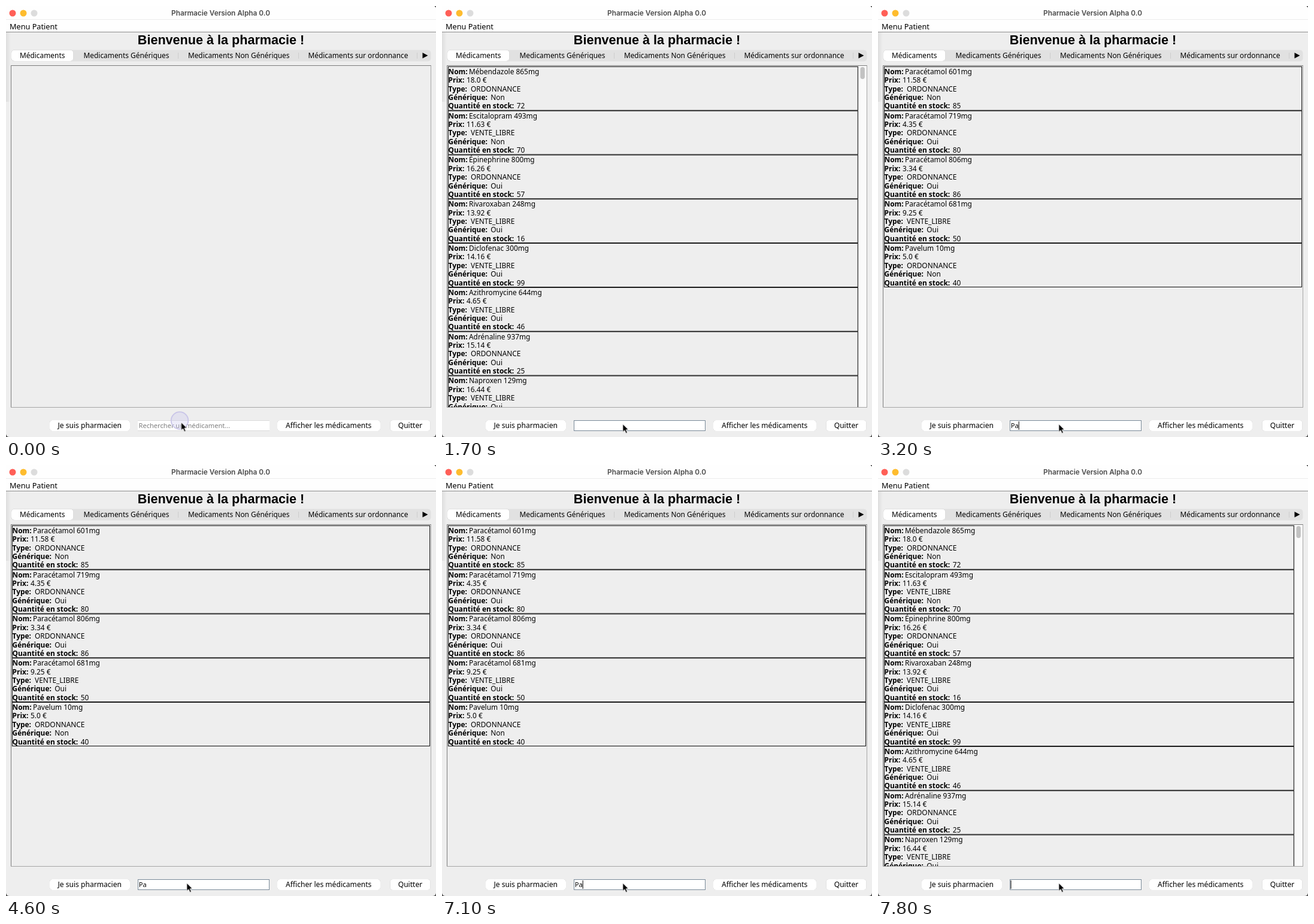
Animation of 718 by 720 pixels, one loop 8000 ms. Source, as an HTML page:

```html
<!DOCTYPE html>
<html lang="fr">
<head>
<meta charset="utf-8">
<title>Pharmacie</title>
<style>
  html, body { margin: 0; width: 100%; height: 100%; overflow: hidden; background: #555; }
  svg { display: block; width: 718px; height: 720px; }
  text { font: 11.9px "Noto Sans", sans-serif; fill: #000; white-space: pre; }
  .label { font-weight: 700; }
  .title { font: 600 11.8px Inter, sans-serif; fill: #4a4a4a; }
  .heading { font: 700 21.6px "Liberation Sans", Arial, sans-serif; }
  .menu { font-size: 12.7px; }
  .button { font-size: 12.1px; }
  .field { font-size: 11.1px; }
  .mid { text-anchor: middle; }
  .raised { fill: #fff; filter: drop-shadow(0 .6px .7px #0005); }

  .idle, .ring, .active, .all, .p, .pa, .par, .caret { animation: 8s step-end infinite; }
  .idle { animation-name: idle; }
  .ring { animation-name: ring; }
  .active { animation-name: active; }
  .all { animation-name: all; }
  .p { animation-name: p; }
  .pa { animation-name: pa; }
  .par { animation-name: par; }
  .caret { animation-name: blink; }
  .cursor { animation: move 8s linear infinite; }

  @keyframes idle { 0% { visibility: visible } 2.5%, 100% { visibility: hidden } }
  @keyframes ring { 0% { visibility: visible } 1.25%, 100% { visibility: hidden } }
  @keyframes active { 0% { visibility: hidden } 2.5%, 100% { visibility: visible } }
  @keyframes all {
    0%, 36.25% { visibility: hidden }
    2.5%, 97.5%, 100% { visibility: visible }
  }
  @keyframes p {
    0%, 38.75%, 97.5%, 100% { visibility: hidden }
    36.25%, 90% { visibility: visible }
  }
  @keyframes pa {
    0%, 58.75%, 90%, 100% { visibility: hidden }
    38.75%, 86.25% { visibility: visible }
  }
  @keyframes par {
    0%, 86.25%, 100% { visibility: hidden }
    58.75% { visibility: visible }
  }
  @keyframes blink {
    0%, 15%, 27.5%, 36.25%, 51.25%, 58.75%, 71.25%, 83.75%, 100% { opacity: 1 }
    8.75%, 21.25%, 33.75%, 45%, 57.5%, 65%, 77.5% { opacity: 0 }
  }
  @keyframes move {
    0%, 5.6% { transform: translate(292.5px, 695.5px); animation-timing-function: ease-in-out }
    14.5%, 100% { transform: translate(301.8px, 698.3px) }
  }
</style>
</head>
<body>
<svg viewBox="0 0 718 720">
  <defs>
    <clipPath id="view"><rect x="9" y="100" width="700" height="570"/></clipPath>
    <linearGradient id="shade"><stop stop-color="#dedede"/><stop offset="1" stop-color="#eee"/></linearGradient>
  </defs>

  <path d="M0 0H715L718 3V715Q717 720 712 720H6Q1 720 0 715Z" fill="#eee"/>
  <path d="M0 0H715L718 3V43H0Z" fill="#fefefe"/>
  <path d="M0 22.5H718" stroke="#ececec"/>
  <path d="M0 43.5H718" stroke="#8c8c8c"/>
  <rect y="44" width="8" height="116" fill="url(#shade)"/>
  <circle cx="11" cy="12" r="5.5" fill="#ff5f57"/>
  <circle cx="29" cy="12" r="5.5" fill="#febc2e"/>
  <circle cx="47" cy="12" r="5.5" fill="#dcdcdc"/>
  <text class="title mid" x="358.5" y="16">Pharmacie Version Alpha 0.0</text>
  <text class="menu" x="6" y="39">Menu Patient</text>
  <text class="heading mid" x="359" y="64">Bienvenue à la pharmacie !</text>

  <rect x="8.5" y="73.5" width="701" height="19" rx="5" fill="#e1e1e1"/>
  <rect class="raised" x="9" y="73.5" width="103.5" height="18.5" rx="5"/>
  <path d="M287.5 78V88M488.5 78V88M686.5 78V88" stroke="#cdcdcd"/>
  <path d="M695.5 78V87.5L704.5 82.7Z"/>
  <text class="mid" x="60.7" y="87">Médicaments</text>
  <text class="mid" x="201" y="87">Medicaments Génériques</text>
  <text class="mid" x="388.7" y="87">Medicaments Non Génériques</text>
  <text class="mid" x="588" y="87">Médicaments sur ordonnance</text>

  <rect x="8.5" y="99.5" width="701" height="571" fill="#eee" stroke="#a6a6a6"/>
  <path d="M8.5 670V99.5H709.5" fill="none" stroke="#7c7c7c"/>

  <rect class="raised" x="73" y="692" width="134" height="18" rx="4.5"/>
  <rect class="raised" x="453" y="692" width="172" height="18" rx="4.5"/>
  <rect class="raised" x="641.5" y="692" width="67" height="18" rx="4.5"/>
  <text class="button mid" x="139.7" y="705">Je suis pharmacien</text>
  <text class="button mid" x="538.7" y="705">Afficher les médicaments</text>
  <text class="button mid" x="675" y="705">Quitter</text>

  <rect x="220" y="692.5" width="220" height="17" fill="#fff"/>
  <g class="idle">
    <path d="M220 692.5H440M220 709.5H440" stroke="#dadada"/>
    <text class="field" x="221.5" y="705.3" style="fill:#7f7f7f">Rechercher un médicament...</text>
  </g>
  <rect class="active" x="220.5" y="692.5" width="219" height="17" fill="none" stroke="#7a8a99"/>

  <g id="lists"></g>

  <circle class="ring" cx="290" cy="692.5" r="14.3" fill="#c8c4ee" fill-opacity=".3" stroke="#c9c5e8" stroke-width="1.8"/>
  <path class="cursor" d="M0 0V13.4L3.1 10.6 5.4 15.6 7.7 14.6 5.5 9.7H9.6Z" stroke="#fff" stroke-width=".9"/>
</svg>

<script>
  const paracetamols = [
    "Paracétamol 601mg|11.58|O|Non|85",
    "Paracétamol 719mg|4.35|O|Oui|80",
    "Paracétamol 806mg|3.34|O|Oui|86",
    "Paracétamol 681mg|9.25|V|Oui|50"
  ];
  const searches = [
    { id: "all", typed: "", caret: 221.5, thumb: 20, items: [
      "Mébendazole 865mg|18.0|O|Non|72",
      "Escitalopram 493mg|11.63|V|Non|70",
      "Épinephrine 800mg|16.26|O|Oui|57",
      "Rivaroxaban 248mg|13.92|V|Oui|16",
      "Diclofenac 300mg|14.16|V|Oui|99",
      "Azithromycine 644mg|4.65|V|Oui|46",
      "Adrénaline 937mg|15.14|O|Oui|25",
      "Naproxen 129mg|16.44|V|Oui|31"
    ] },
    { id: "p", typed: "P", caret: 228.5, thumb: 167, items: [
      "Prochlorperazine 404mg|4.38|O|Non|75",
      "Phénobarbital 600mg|2.6|O|Non|16",
      "Pseudoéphédrine 308mg|7.31|V|Oui|69",
      "Paracétamol 601mg|11.58|O|Non|85",
      "Pulvo-Gastem 432mg|10.87|V|Non|68",
      "Pyrantel 314mg|10.91|O|Oui|58",
      "Phényléphrine 854mg|6.49|V|Oui|100",
      "Phénytoïne 557mg|13.03|O|Oui|42"
    ] },
    { id: "pa", typed: "Pa", caret: 234.7, items: [...paracetamols, "Pavelum 10mg|5.0|O|Non|40"] },
    { id: "par", typed: "Par", caret: 239.4, items: paracetamols }
  ];

  const labels = ["Nom:", "Prix:", "Type:", "Générique:", "Quantité en stock:"];
  const valueX = [45, 41, 48, 81.3, 124.8];
  const types = { O: "ORDONNANCE", V: "VENTE_LIBRE" };
  const top0 = 100.9, rowHeight = 73.8, lineHeight = 14.4;

  const drawItem = (item, row, right) => {
    const [name, price, type, generic, stock] = item.split("|");
    const values = [name, price + " €", types[type], generic, stock];
    const y = top0 + row * rowHeight;
    const lines = labels.map((label, i) => {
      const base = y + 12.9 + i * lineHeight;
      return `<text class="label" x="10.6" y="${base}">${label}</text>
        <text x="${valueX[i]}" y="${base}">${values[i]}</text>`;
    });
    return `<rect x="10.4" y="${y + .46}" width="${right - 10.4}" height="${rowHeight - .92}"
      fill="none" stroke="#000" stroke-width=".95"/>` + lines.join("");
  };

  const drawScrollbar = height => `<rect x="695" y="100" width="14" height="570" fill="#fafafa"/>
    <path d="M695.5 100V670" stroke="#e4e4e4"/>
    <rect x="698.5" y="102" width="7.4" height="${height}" rx="3.7" fill="#c2c2c2"/>`;

  const drawSearch = ({ id, typed, caret, thumb, items }) => `<g class="${id}">
    <g clip-path="url(#view)">
      ${thumb ? drawScrollbar(thumb) : ""}
      ${items.map((item, row) => drawItem(item, row, thumb ? 694.3 : 707.6)).join("")}
    </g>
    <text class="field" x="221.7" y="705.3">${typed}</text>
    <rect class="caret" x="${caret}" y="694" width="1" height="14"/>
  </g>`;

  document.getElementById("lists").innerHTML = searches.map(drawSearch).join("");
</script>
</body>
</html>
```
